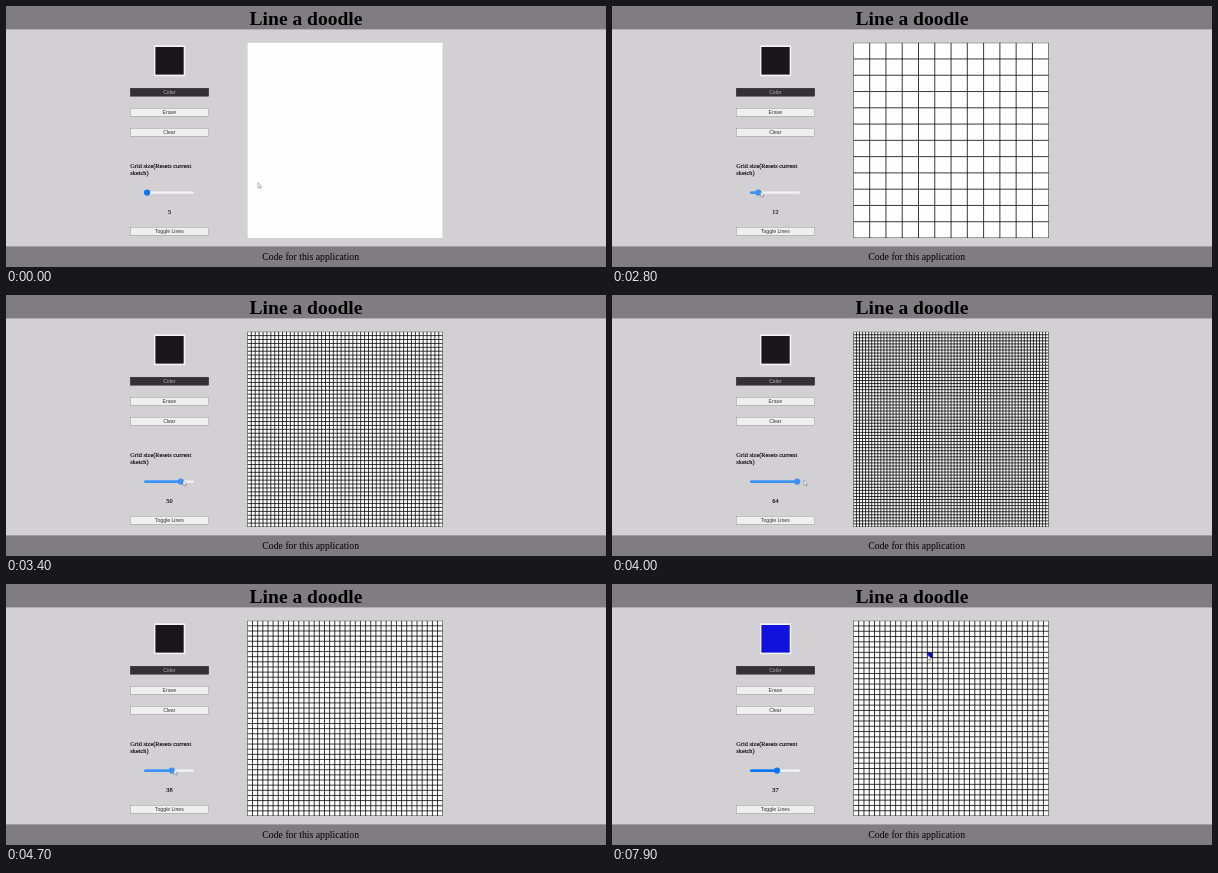
An HTML page for the animation above (8000 ms loop, 600 px wide and 261 px high).

```html
<!DOCTYPE html>
<html lang="en">
<head>
<meta charset="utf-8">
<title>Line a doodle</title>
<style>
  html, body { margin: 0; width: 100%; height: 100%; overflow: hidden; background: #d3d0d3; }
  svg { display: block; width: 600px; height: 261px; }
  text { font-family: "Liberation Serif", "Times New Roman", serif; fill: #000; }
  .mid { text-anchor: middle; }
  .title { font-size: 19.55px; font-weight: bold; }
  .foot { font-size: 9.75px; }
  .label { font-size: 6.3px; stroke: #000; stroke-width: .12; }
  .btn rect { fill: #efefef; stroke: #858585; stroke-width: .4; }
  .btn text { font: 5.15px "Liberation Sans", Arial, sans-serif; text-anchor: middle; fill: #333; }
  .btn.hover rect { fill: #e5e5e5; }
  .btn.dark rect { fill: #333133; stroke: #222; }
  .btn.dark text { fill: #b8b6b8; }
</style>
</head>
<body>
<svg viewBox="0 0 600 261">
  <rect width="600" height="261" fill="#d3d0d3"/>
  <rect width="600" height="23.4" fill="#7f7d7f"/>
  <rect y="240.4" width="600" height="21" fill="#7f7d7f"/>
  <text class="title mid" x="300" y="18.8">Line a doodle</text>
  <text class="foot mid" x="304.7" y="254">Code for this application</text>

  <rect x="148" y="39.3" width="31.2" height="30.9" fill="#f4f3f4"/>
  <rect id="swatch" x="149.4" y="41" width="28.3" height="27.6"/>
  <g id="buttons"></g>

  <text class="label" x="124.3" y="162">Grid size(Resets current</text>
  <text class="label" x="124.3" y="169">sketch)</text>
  <rect x="138" y="185.3" width="50" height="2.6" rx="1.2" fill="#f2f2f2" stroke="#bbb" stroke-width=".2"/>
  <rect id="fill" x="138" y="185.2" height="2.8" rx="1.3"/>
  <circle id="thumb" cy="186.6" r="3.1"/>
  <text id="count" class="label mid" x="163.5" y="207.6"></text>

  <svg x="241.4" y="36.7" width="195.3" height="195.3">
    <rect width="100%" height="100%" fill="#fefefe"/>
    <rect id="cell" fill="#1212d0"/>
    <path id="lines" fill="none" stroke="#000" stroke-width=".78"/>
  </svg>
  <path id="cursor" d="M0 0V5.2L1.2 4.2 2 6 2.8 5.7 2.1 4H3.7Z" fill="#fff" stroke="#555" stroke-width=".4"/>
</svg>
<script>
const LOOP = 8000, STEP = 100;
const SIDE = 195.3, MIN = 5, MAX = 64;
const THUMB = 141.1, TRAVEL = 44.1, GRAB = 2;
const DRAG = [2400, 4900];
const LINES_ON = 1400, PICKED = 6500, PAINTED = 7800;

const $ = id => document.getElementById(id);
const clamp = (v, lo, hi) => Math.min(hi, Math.max(lo, v));
const linear = k => k;
const easeIn = k => k * k;
const easeOut = k => 1 - (1 - k) ** 2;
const smooth = k => k * k * (3 - 2 * k);

const home = { x: 252, y: 176.6 };
const moves = [
  { start: 0, end: 1400, x: 151.5, y: 226, ease: easeIn },
  { start: 1800, end: 2400, x: THUMB + GRAB, y: 185.5, ease: smooth },
  { start: 2400, end: 3600, x: 192, y: 185.2, ease: easeIn },
  { start: 4000, end: 4900, x: 166.7, y: 185.3, ease: easeOut },
  { start: 4900, end: 5500, x: 164, y: 53.5, ease: smooth },
  { start: 5900, end: 6100, x: 183.7, y: 70.8, ease: linear },
  { start: 6800, end: 7500, x: 328.5, y: 66, ease: smooth },
  { start: 7500, end: 7900, x: 315.8, y: 71, ease: easeOut }
];

function pointerAt(t) {
  let { x, y } = home;
  for (const m of moves) {
    const k = m.ease(clamp((t - m.start) / (m.end - m.start), 0, 1));
    x += (m.x - x) * k;
    y += (m.y - y) * k;
  }
  return { x, y };
}

// The slider follows the pointer only while it is held.
function sizeAt(t) {
  const { x } = pointerAt(clamp(t, ...DRAG));
  const k = clamp((x - GRAB - THUMB) / TRAVEL, 0, 1);
  return Math.round(MIN + (MAX - MIN) * k);
}

function gridPath(n) {
  let d = "";
  for (let i = 0; i <= n; i++) {
    const p = SIDE * i / n;
    d += `M${p} 0v${SIDE}M0 ${p}h${SIDE}`;
  }
  return d;
}

function set(id, attrs) {
  for (const key in attrs) $(id).setAttribute(key, attrs[key]);
}

const buttons = [["Color", 82.2], ["Erase", 102.2], ["Clear", 122.2], ["Toggle Lines", 221.2]]
  .map(([label, y], i) => {
    const g = document.createElementNS("http://www.w3.org/2000/svg", "g");
    g.innerHTML = `<rect x="124.3" y="${y}" width="78.4" height="8"/>` +
      `<text x="163.3" y="${y + 5.8}">${label}</text>`;
    $("buttons").append(g);
    return { g, y, base: i ? "btn" : "btn dark" };
  });

function draw(t) {
  const { x, y } = pointerAt(t);
  const n = sizeAt(t), unit = SIDE / n;
  const thumbX = THUMB + TRAVEL * (n - MIN) / (MAX - MIN);
  const held = t >= DRAG[0] && t < DRAG[1];
  const over = Math.hypot(x - thumbX, y - 186.6) < 4;
  const blue = held ? "#3a91f7" : over ? "#0563cf" : "#0b76f3";

  set("cursor", { transform: `translate(${x} ${y})` });
  set("thumb", { cx: thumbX, fill: blue });
  set("fill", { width: thumbX - 138, fill: blue });
  $("count").textContent = n;
  set("swatch", { fill: t < PICKED ? "#19171a" : "#1212de" });
  set("lines", { d: t < LINES_ON ? "" : gridPath(n) });
  set("cell", {
    x: 14 * unit, y: 6 * unit, width: unit, height: unit,
    visibility: t < PAINTED ? "hidden" : "visible"
  });

  for (const b of buttons) {
    const hover = x > 124 && x < 203 && y > b.y && y < b.y + 8;
    b.g.setAttribute("class", hover ? b.base + " hover" : b.base);
  }
}

let last = -1;
function tick() {
  const t = Math.floor(performance.now() % LOOP / STEP) * STEP;
  if (t !== last) draw(last = t);
  requestAnimationFrame(tick);
}
tick();
</script>
</body>
</html>
```
